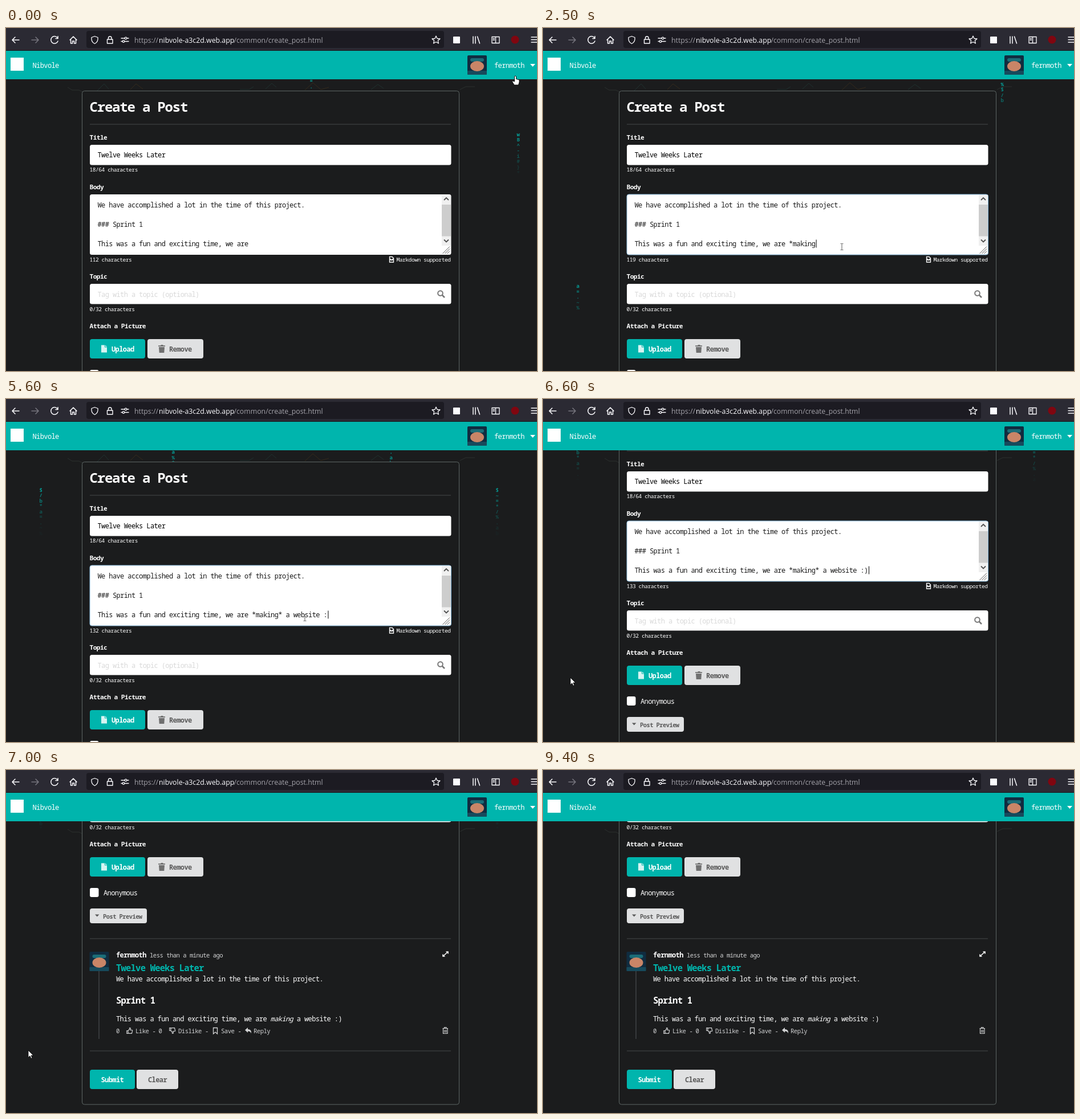
An HTML page for the animation above (9.9 s loop, 931 by 602 pixels).

```html
<!DOCTYPE html>
<html lang="en">
<head>
<meta charset="utf-8">
<title>Create a Post</title>
<style>
html, body { margin: 0; width: 100%; height: 100%; overflow: hidden; background: #1b1c1d; }
svg { display: block; }
text { font-family: "Noto Sans Mono", "DejaVu Sans Mono", monospace; letter-spacing: -.05em; white-space: pre; }
.url text { font-family: "Open Sans", "Noto Sans", sans-serif; letter-spacing: 0; }
.b { font-weight: 700; }
</style>
</head>
<body>
<svg id="stage" width="931" height="602" viewBox="0 0 931 602"></svg>
<script>
const TEAL = '#00b5ad', GREY = '#e0e1e2', INK = '#5a5a5a', WHITE = '#fff', SOFT = '#d2d3d4';
const USER = 'fernmoth', SITE = 'Nibvole', TITLE = 'Twelve Weeks Later';
const INTRO = 'We have accomplished a lot in the time of this project.';
const START = 'This was a fun and exciting time, we are ';
const TYPED = '*making* a website :)';
const LOOP = 9900, STEP = 100;

const rect = (x, y, w, h, fill, r = 0, more = '') =>
  `<rect x="${x}" y="${y}" width="${w}" height="${h}" rx="${r}" fill="${fill}" ${more}/>`;
const line = (d, stroke, w = 1, more = '') =>
  `<path d="${d}" fill="none" stroke="${stroke}" stroke-width="${w}" ${more}/>`;
const fill = (d, color) => `<path d="${d}" fill="${color}"/>`;
const text = (x, y, size, str, color = WHITE, more = '') =>
  `<text x="${x}" y="${y}" font-size="${size}" fill="${color}" ${more}>${str}</text>`;
const bold = (x, y, size, str, color) => text(x, y, size, str, color, 'class="b"');
const group = (str, more = '') => `<g ${more}>${str}</g>`;
const at = (x, y, str, more = '') => group(str, `transform="translate(${x} ${y})${more}"`);

// icons
const avatar = (x, y) => at(x, y,
  rect(0, 0, 34, 34, '#102c40', 2) + rect(5, 5, 24, 6, '#1b6d78', 3) +
  rect(0, 27, 34, 7, '#174a5c', 1) +
  '<ellipse cx="17" cy="19" rx="12" ry="9" fill="#c98567"/>');
const doc = (x, y, color) => at(x, y,
  fill('M0 0H6V4H10V13H0ZM7 0L10 3H7Z', color));
const bin = (x, y, color) => at(x, y,
  fill('M0 1.2H4L5 0H8L9 1.2H12V3H0ZM1 4H11L10.3 14H1.7Z', color));
const thumb = 'M.8 5.5H3V10.5H.8ZM3 5.5L5.5 3V.8Q7.8 .2 7.5 2.5L7 4.5H10.3Q11 5 10.5 6.3L9.5 10.3H5L3 9.5';

function toolbar() {
  const c = '#fbfbfe', icon = (d, color = c, w = 1.5) =>
    line(d, color, w, 'stroke-linecap="round" stroke-linejoin="round"');
  return rect(0, 0, 931, 40, '#2b2a33') + rect(0, 39, 931, 1, '#17161c') +
    rect(141, 5, 627, 30, '#1c1b22', 4) +
    icon('M11 21H23M16 16L11 21L16 26') +
    icon('M45 21H57M52 16L57 21L52 26', '#77767f') +
    icon('M90 17A6.3 6.3 0 1 0 91 23M91 14.500V18.500H87') +
    icon('M112 21L118 15L124 21M113.500 20V27H116.500V23H119.500V27H122.500V20') +
    icon('M155.500 14.500L161 16.500V20Q160.500 25 155.500 27.500Q150.500 25 150 20V16.500Z', c, 1.3) +
    icon('M177.500 20H187V27H177.500ZM179.500 20V17A2.8 2.8 0 0 1 185 17V20', c, 1.4) +
    icon('M202 18H208M212 18H215M202 23.500H204M208 23.500H215', c, 1.3) +
    '<g fill="none" stroke="#fbfbfe" stroke-width="1.3"><circle cx="210" cy="18" r="1.800"/><circle cx="206" cy="23.500" r="1.800"/></g>' +
    group(text(225, 26, 12.3, 'https://', '#a3a2a9') +
      text(268, 26, 12.3, SITE.toLowerCase() + '-a3c2d.web.app', c) +
      text(399.5, 26, 12.3, '/common/create_post.html', '#a3a2a9'), 'class="url"') +
    icon('M754 14L756 18.500L761 19L757.300 22.300L758.400 27L754 24.500L749.600 27L750.700 22.300L747 19L752 18.500Z', c, 1.3) +
    rect(784, 15, 12, 12, c, 1) +
    icon('M819 15V27M823 15V27M826.500 15L830.500 27', c, 1.5) +
    icon('M852 15.500H865V26.500H852ZM858.500 15.500V26.500M854 18.500H856.500M854 21H856.500', c, 1.3) +
    '<circle cx="892.500" cy="20.500" r="7" fill="#800610"/>' +
    icon('M921 16H931M921 20.500H931M921 25H931', c, 1.4);
}

const header = () => rect(0, 40, 931, 50, TEAL) + rect(8, 52, 23, 23, WHITE) +
  text(46.5, 69.5, 12, SITE) + avatar(809, 48) + text(856, 69.5, 12, USER) +
  fill('M919 63H928L923.500 68Z', WHITE);

const field = (y, h, id = '') => rect(147, y, 633.5, h, WHITE, 3.5, id);
const button = (x, y, w, h, color) => rect(x, y, w, h, color, 4);
const hr = y => rect(147, y, 633, 1, '#46484a');

function form() {
  const label = (y, s) => bold(146.5, y, 11.2, s);
  const note = (y, s, id = '') => text(146.5, y, 9.6, s, WHITE, id);
  return rect(133.5, 110.5, 661, 869.5, '#1b1c1d', 4, 'stroke="#5d6664"') +
    bold(146.5, 147, 24, 'Create a Post') + hr(168.5) +
    label(196, 'Title') + field(205, 35.5) + text(160.5, 227, 12, TITLE, '#000') +
    note(251.5, '18/64 characters') +
    label(283, 'Body') + field(292, 106, 'id="area"') +
    text(160.5, 314.5, 12, INTRO, '#1b1b1b') + text(160.5, 348.5, 12, '### Sprint 1', '#1b1b1b') +
    text(160.5, 382.5, 12, '', '#1b1b1b', 'id="typed"') + rect(0, 371.5, 1, 14, '#000', 0, 'id="caret"') +
    rect(764, 293, 16, 89, '#f0f0f0') + rect(764, 310, 16, 55.500, '#cdcdcd') +
    line('M768 302L772 298L776 302M768 371.500L772 375.500L776 371.500', '#505050', 1.800) +
    line('M765.500 396L778 383.500M769.500 396L778 387.500M773.500 396L778 391.500', '#555') +
    note(410, '', 'id="count"') +
    line('M672.500 401.500H677L679.500 404V411H672.500ZM674 408V405.500L676 407.500L678 405.500V408', WHITE, 1.3) +
    text(684.5, 410, 9.6, 'Markdown supported') +
    label(440, 'Topic') + field(449, 35.5) +
    text(160.5, 471.5, 12, 'Tag with a topic (optional)', '#d9d9d9') +
    '<circle cx="761.500" cy="465.500" r="4.300" fill="none" stroke="#777" stroke-width="2"/>' +
    line('M764.500 468.500L769 473', '#777', 2.5) +
    note(497, '0/32 characters') + label(527, 'Attach a Picture') +
    button(147, 546, 97, 34, TEAL) + doc(167, 556.5, '#d5f4f2') + bold(185, 568, 12, 'Upload') +
    button(248, 546, 98, 34, GREY) + bin(267, 556, '#707070') + bold(286, 568, 12, 'Remove', INK) +
    rect(147, 600, 15.5, 16, WHITE, 3) + text(171, 613, 12, 'Anonymous') +
    button(147, 636, 100, 26, GREY) + fill('M156 646.500H163.500L159.700 650.500Z', INK) +
    bold(170, 653.5, 10.4, 'Post Preview', INK);
}

function preview() {
  const act = (x, s) => text(x, 855, 10.6, s, SOFT);
  return hr(688.5) + avatar(146.5, 712) + rect(162.5, 746, 1, 119, '#55575a') +
    bold(193, 722, 12, USER) + text(252, 722, 10.6, 'less than a minute ago', SOFT) +
    line('M766 720L775 712M766 716.500V720H769.500M771.500 712H775V715.500', WHITE, 1.6) +
    bold(193, 746, 15.5, TITLE, TEAL) + text(193, 764, 12, INTRO) + bold(193, 802.5, 15.5, 'Sprint 1') +
    text(193, 834, 12, START + '<tspan font-style="italic">making</tspan> a website :)') +
    act(193, '0') + at(211, 845, line(thumb, SOFT, 1.2)) + act(227, 'Like') + act(256.5, '-') +
    act(267.5, '0') + at(286, 856, line(thumb, SOFT, 1.2), ' scale(1 -1)') + act(302, 'Dislike') + act(349, '-') +
    line('M363.500 845.500H370.500V856L367 853L363.500 856Z', SOFT, 1.3) + act(377, 'Save') + act(406.5, '-') +
    fill('M419 849.500L424 845V848Q431 848 430 855.500Q428.500 851 424 851.500V854Z', SOFT) + act(434, 'Reply') +
    line('M765.500 846.500H775M768.500 846V844.800H772V846M766.500 847V855.500H774V847M769 849V854M771.500 849V854', SOFT, 1.2) +
    hr(885.5) + button(147, 919, 79, 34, TEAL) + bold(166.5, 941, 12, 'Submit') +
    button(229, 919, 73, 34, GREY) + bold(249, 941, 12, 'Clear', INK);
}

const backdrop = () =>
  line('M108 104L116 109H128L134 112M796 108L806 103H822', '#2c302f') +
  line('M160 110L172 98L180 107M410 108H426L434 103M455 107L466 97L474 104M640 108L652 99L662 106', '#20312f') +
  line('M218 108L228 98L240 107M524 109L538 96L552 108L566 104', '#352a1c');

const pointers = {
  arrow: '<path d="M0 0V12.500L3 9.800L5 14.300L7 13.400L5 9H9Z" fill="#fff" stroke="#000" stroke-width=".8"/>',
  hand: '<path d="M-1.500 1Q0-1 1.500 1V5.500L7 7V11L5.500 16H-2L-5.500 10Q-5 8-1.500 10Z" fill="#fff" stroke="#000" stroke-width=".9"/>',
  beam: line('M-2.500-5.500H-.5L0-5L.5-5.500H2.500M0-5V5M-2.500 5.500H-.5L0 5L.5 5.500H2.500', '#777', 1.2)
};

document.getElementById('stage').innerHTML =
  rect(0, 0, 931, 602, '#1b1c1d') + backdrop() + group('', 'id="rain"') +
  group(form() + preview(), 'id="page"') + header() + toolbar() +
  Object.entries(pointers).map(([k, s]) => group(s, `id="${k}"`)).join('');

const el = id => document.getElementById(id);
const page = el('page'), rain = el('rain'), typed = el('typed'), count = el('count'),
  caret = el('caret'), area = el('area');

// glyph columns rising one row per step: x, first row, start time
const columns = [
  [898, 256, -700], [535, 153, -600], [805, 130, 2200], [61, 494, 2100], [898, 193, 3100],
  [861, 305, 4100], [293, 153, 5000], [675, 153, 5000], [498, 598, 7600]
];
const GLYPHS = '^=-$B/#%}*ia|bw.+~', PITCH = 9.46, FADE = 900;

function drawRain(t) {
  let out = '';
  for (const [x, y0, t0] of columns) {
    const head = Math.floor((t - t0) / STEP);
    for (let i = Math.max(0, head - 8); i <= head; i++) {
      const y = y0 - i * PITCH;
      if (y < 88) break;
      const a = Math.pow(1 - (t - t0 - i * STEP) / FADE, 1.4) * .85;
      const g = GLYPHS[(i * 7 + x + i * i * 3) % GLYPHS.length];
      out += text(x - 2.5, y.toFixed(1), 9, g, TEAL, `class="b" opacity="${a.toFixed(2)}"`);
    }
  }
  rain.innerHTML = out;
}

// keyframes: time, value...
const path = [
  [0, 893, 84], [900, 524, 384], [6150, 524, 384], [6600, 48, 489], [6800, 41, 492], [7000, 39, 492],
  [7300, 6, 480], [7900, 445, 433], [8200, 445, 433], [8900, 852, 264], [9000, 851, 250],
  [9100, 818, 160], [9200, 806, 90], [9300, 900, 64], [9400, 960, 62]
];
const scrolls = [[6400, 0], [6600, 78], [6800, 132], [6900, 268], [7000, 393]];

function track(keys, t) {
  if (t <= keys[0][0]) return keys[0].slice(1);
  const n = keys.findIndex(k => k[0] > t);
  if (n < 0) return keys[keys.length - 1].slice(1);
  const a = keys[n - 1], b = keys[n], p = (t - a[0]) / (b[0] - a[0]), e = p * p * (3 - 2 * p);
  return a.slice(1).map((v, i) => v + (b[i + 1] - v) * e);
}

// when the n-th letter has been typed
const keyTime = n => n <= 7 ? 1100 + n * 200 : n <= 20 ? 2500 + Math.floor((n - 7) * 238) : 6150;

function render(t) {
  const [scroll] = track(scrolls, t), [x, y] = track(path, t);
  page.setAttribute('transform', `translate(0 ${-scroll})`);

  let n = 0;
  while (n < TYPED.length && keyTime(n + 1) <= t) n++;
  const str = START + TYPED.slice(0, n);
  typed.textContent = str;
  count.textContent = 112 + n + ' characters';
  const focus = t >= 1000, since = t - (n ? keyTime(n) : 1000);
  area.setAttribute('stroke', focus ? '#85b7d9' : 'none');
  caret.setAttribute('x', 161.8 + str.length * 6.6);
  caret.setAttribute('opacity', focus && since % 1000 < 500 ? 1 : 0);

  const overArea = x > 147 && x < 764 && y > 292 && y < 398 && scroll < 1;
  const overText = x > 193 && x < 590 && y > 358 && y < 446 && scroll > 390;
  const kind = y < 90 && x > 804 ? 'hand' : overArea || overText ? 'beam' : 'arrow';
  for (const k in pointers) {
    el(k).setAttribute('display', k === kind ? 'inline' : 'none');
    el(k).setAttribute('transform', `translate(${x.toFixed(1)} ${y.toFixed(1)})`);
  }
  drawRain(t);
}

const begin = performance.now();
function tick() {
  const t = (performance.now() - begin) % LOOP;
  render(Math.min(9400, Math.floor(t / STEP) * STEP));
  requestAnimationFrame(tick);
}
tick();
</script>
</body>
</html>
```
